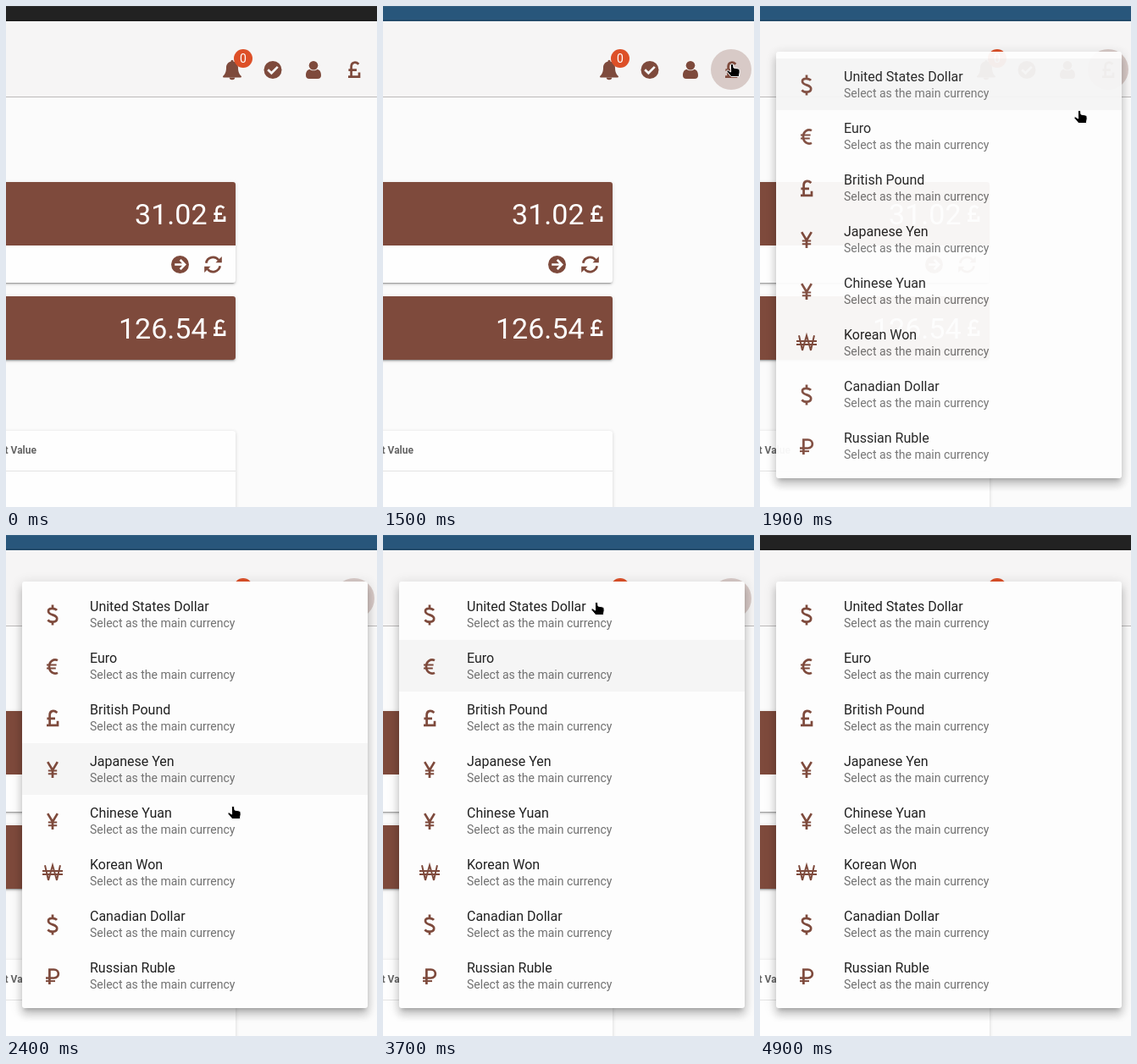
These frames come from a looping animation (438 by 592 pixels, 5.5 s). An HTML page:

```html
<!DOCTYPE html>
<html lang="en">
<head>
<meta charset="utf-8">
<title>Currency menu</title>
<style>
  html, body { margin: 0; width: 100%; height: 100%; overflow: hidden; background: #fbfbfb; }
  #stage { position: relative; width: 438px; height: 592px; overflow: hidden; font-family: Roboto, sans-serif; }
  #stage div, #stage svg { position: absolute; }
  #stage > svg { left: 0; top: 0; }
  #bar { left: 0; top: 0; width: 438px; height: 18px; box-shadow: inset 0 1px rgba(255,255,255,.06), inset 0 -2px rgba(0,0,0,.14); }
  #head { left: 0; top: 18px; width: 438px; height: 89px; background: #f6f5f5; border-bottom: 1px solid #bcbaba; }
  .card {
    left: -20px; width: 291px; border-radius: 3px; background: #fefefe; overflow: hidden;
    box-shadow: 0 3px 1px -2px rgba(0,0,0,.2), 0 2px 2px rgba(0,0,0,.14), 0 1px 5px rgba(0,0,0,.12);
  }
  .fill { left: 0; top: 0; width: 100%; height: 75px; background: #7e4a3c; }
  #table { top: 502px; height: 110px; box-shadow: 0 1px 4px rgba(0,0,0,.16); }
  #table div { left: 0; top: 47px; width: 100%; height: 1px; background: #e2e2e2; }
  #menu {
    left: 19px; top: 55px; width: 408px; height: 504px; border-radius: 3px; background: #fdfdfd;
    box-shadow: 0 5px 5px -3px rgba(0,0,0,.2), 0 8px 10px 1px rgba(0,0,0,.14), 0 3px 14px 2px rgba(0,0,0,.12);
  }
  .line { fill: none; stroke: currentColor; stroke-width: 2.7; }
  .thin { stroke-width: 2; }
  .name { font-size: 16px; fill: #212121; }
  .hint { font-size: 14px; fill: #717171; }
  .sum { font-size: 34px; fill: #fff; text-anchor: end; }
</style>
</head>
<body>
<div id="stage">
  <div id="bar"></div>
  <div id="head"></div>
  <div class="card" style="top:208px;height:119px"><div class="fill"></div></div>
  <div class="card" style="top:343px;height:75px"><div class="fill"></div></div>
  <div class="card" id="table"><div></div></div>
  <svg id="page" width="438" height="592" color="#7e4a3c"></svg>
  <div id="menu"><svg id="list" width="408" height="504" color="#7e4a3c"></svg></div>
  <svg width="438" height="592">
    <g id="cursor" stroke="#fff" stroke-width="1">
      <path id="arrow" d="M0 0V15.5L3.6 12.2L6.3 18L8.8 16.9L6.2 11.3H11Z"/>
      <path id="hand" d="M-1.6 1.5Q0 -1 1.6 1.5L2 5L7.5 6Q9.5 7 9.2 10L8.3 15.5H-1L-6 9.5Q-6.5 7.3 -4.5 8L-1.4 10Z"/>
    </g>
  </svg>
</div>
<script>
const LOOP = 5500, STEP = 100, ROW = 61;
const $ = id => document.getElementById(id);

const line = (d, cls = '') => `<path class="line ${cls}" d="${d}"/>`;
const shape = d => `<path fill="currentColor" d="${d}"/>`;
const disc = (r, y = 0) => `<circle cy="${y}" r="${r}" fill="currentColor"/>`;
const sweep = 'M-8.2 -1.8A8.3 8.3 0 0 1 6.6 -5.2';
const head = 'M10.3 -9.6V-2.3H3Z';

const icons = {
  dollar: line('M5 -5.6C3 -8.2 -5 -9 -5 -4.5C-5 1 5.2 -1.2 5.2 4.3C5.2 9.4 -3 9 -5.6 5.8M0 -12V-7.5M0 7.5V12'),
  euro: line('M6 -7.4C1.5 -9.6 -4 -6.5 -4 0C-4 6.5 1.5 9.6 6 7.4') + line('M-7 -1.9H4.6M-7 1.9H3.8', 'thin'),
  pound: line('M5.4 -6.6C1.4 -10.2 -3.4 -8.6 -3.4 -3.8V8M-6.6 .4H3M-7 8.3H6V3.2'),
  yen: line('M-5.8 -9.4L0 .4L5.8 -9.4M0 0V9.5') + line('M-5.2 1H5.2M-5.2 4.8H5.2', 'thin'),
  won: line('M-9 -9.2L-5 8.4L0 -9.2L5 8.4L9 -9.2', 'thin') + line('M-12 -2.4H12M-12 1.4H12', 'thin'),
  ruble: line('M-3.6 9.5V-8H1.6C8.6 -8 8.6 2 1.6 2H-8') + line('M-8 5.6H3', 'thin'),
  bell: shape('M0 -11.5C1 -11.5 1.6 -10.8 1.4 -9.8C5 -9 7 -6 7 -2.5C7 3 8.5 5.5 11 7.8C11 8.8 10.4 9.3 9.5 9.3H-9.5C-10.4 9.3 -11 8.8 -11 7.8C-8.5 5.5 -7 3 -7 -2.5C-7 -6 -5 -9 -1.4 -9.8C-1.6 -10.8 -1 -11.5 0 -11.5ZM-3.3 9A3.3 2.9 0 0 0 3.3 9Z'),
  check: disc(10.5) + '<g color="#f6f5f5">' + line('M-5.8 -.3L-1.6 3.8L5.8 -3.6') + '</g>',
  user: disc(5.3, -5.2) + shape('M-4.5 -.8C-8 0 -9 3 -9 6.5C-9 9 -7.5 10.5 -5 10.5H5C7.5 10.5 9 9 9 6.5C9 3 8 0 4.5 -.8C2 1.4 -2 1.4 -4.5 -.8Z'),
  go: disc(10.5) + '<g color="#fefefe">' + line('M-6.3 0H5M.2 -5.6L5.6 0L.2 5.6') + '</g>',
  reload: [0, 180].map(a => `<g transform="rotate(${a})">${line(sweep)}${shape(head)}</g>`).join('')
};
const icon = (name, x, y, color = '') =>
  `<g transform="translate(${x} ${y})" ${color && `color="${color}"`}>${icons[name]}</g>`;
const text = (s, x, y, cls, extra = '') => `<text x="${x}" y="${y}" class="${cls}" ${extra}>${s}</text>`;

$('page').innerHTML =
  '<circle id="halo" cx="411" cy="75" r="24" fill="#7e4a3c"/>' +
  icon('bell', 267, 75.3) + icon('check', 315, 75.5) + icon('user', 363, 75.5) + icon('pound', 411, 75.3) +
  '<circle cx="280" cy="62" r="11" fill="#dd5028"/>' +
  text('0', 280, 67, '', 'font-size="14" fill="#fff" text-anchor="middle"') +
  text('31.02', 237.5, 257.5, 'sum') + icon('pound', 252, 245.3, '#fff') +
  icon('go', 205.5, 305.5) + icon('reload', 244.5, 305.5) +
  text('126.54', 237.5, 392.5, 'sum') + icon('pound', 252, 380.3, '#fff') +
  text('t Value', 36, 529, '', 'font-size="12" font-weight="700" fill="#666" text-anchor="end"');

const currencies = [
  ['dollar', 'United States Dollar'], ['euro', 'Euro'], ['pound', 'British Pound'], ['yen', 'Japanese Yen'],
  ['yen', 'Chinese Yuan'], ['won', 'Korean Won'], ['dollar', 'Canadian Dollar'], ['ruble', 'Russian Ruble']
];
$('list').innerHTML = currencies.map(([sign, name], i) =>
  `<g transform="translate(0 ${8 + i * ROW})"><rect class="row" width="408" height="${ROW}" fill-opacity=".033"/>` +
  icon(sign, 36, 31.5) + text(name, 80, 27, 'name') + text('Select as the main currency', 80, 46, 'hint') + '</g>'
).join('');

// Samples a style function of time into held steps.
function play(el, style) {
  const n = LOOP / STEP, frames = [];
  for (let i = 0; i <= n; i++)
    frames.push({ offset: i / n, easing: 'step-end', ...style(Math.min(i, n - 1) * STEP) });
  el.animate(frames, { duration: LOOP, iterations: Infinity, delay: -10 });
}

// Last value in a [time, value] table at or before t.
const held = (table, t) => table.reduce((v, [at, next]) => t >= at ? next : v, table[0][1]);

const path = [
  [800, 405, 159], [1000, 409, 130], [1200, 412, 88], [1400, 412, 69], [1700, 412, 67], [1900, 377, 123],
  [2200, 305, 255], [2500, 249, 352], [2800, 140, 440], [3000, 55, 500], [3100, 68, 519], [3200, 140, 465],
  [3400, 205, 320], [3700, 252, 79], [3900, 235, 205], [4200, 107, 505]
];
const HIDE = 4300;
function pointer(t) {
  const k = Math.max(1, path.findIndex(p => p[0] >= t));
  const [t0, x0, y0] = path[k - 1], [t1, x1, y1] = path[k];
  const f = Math.min(1, Math.max(0, (t - t0) / (t1 - t0)));
  return [x0 + (x1 - x0) * f, y0 + (y1 - y0) * f];
}
const shown = t => t >= path[0][0] && t < HIDE;

const barColors = [[0, '#222222'], [100, '#26435a'], [200, '#28567b'], [4700, '#284b68'], [4800, '#24323e'], [4900, '#222222']];
const haloAlpha = [[0, 0], [1200, .07], [1400, .15], [1500, .25], [4700, .16], [4800, .06], [4900, 0]];
const menuAlpha = [[0, 0], [1600, .15], [1700, .57], [1800, .86], [1900, .96], [2000, 1]];

play($('bar'), t => ({ backgroundColor: held(barColors, t) }));
play($('halo'), t => ({ opacity: held(haloAlpha, t) }));
play($('menu'), t => {
  const a = held(menuAlpha, t);
  return { opacity: a, transform: `translateY(${-Math.round(15 * (1 - a))}px)` };
});
play($('cursor'), t => {
  const [x, y] = shown(t) ? pointer(t) : [0, 0];
  return { opacity: +shown(t), transform: `translate(${Math.round(x)}px, ${Math.round(y)}px)` };
});
play($('arrow'), t => ({ opacity: +(t < 1200) }));
play($('hand'), t => ({ opacity: +(t >= 1200) }));

// The row highlight trails the pointer by one step.
document.querySelectorAll('.row').forEach((row, i) => play(row, t => {
  const over = t >= 1600 && t < HIDE && Math.floor((pointer(t - STEP)[1] - 63) / ROW) === i;
  return { opacity: +over };
}));
</script>
</body>
</html>
```
